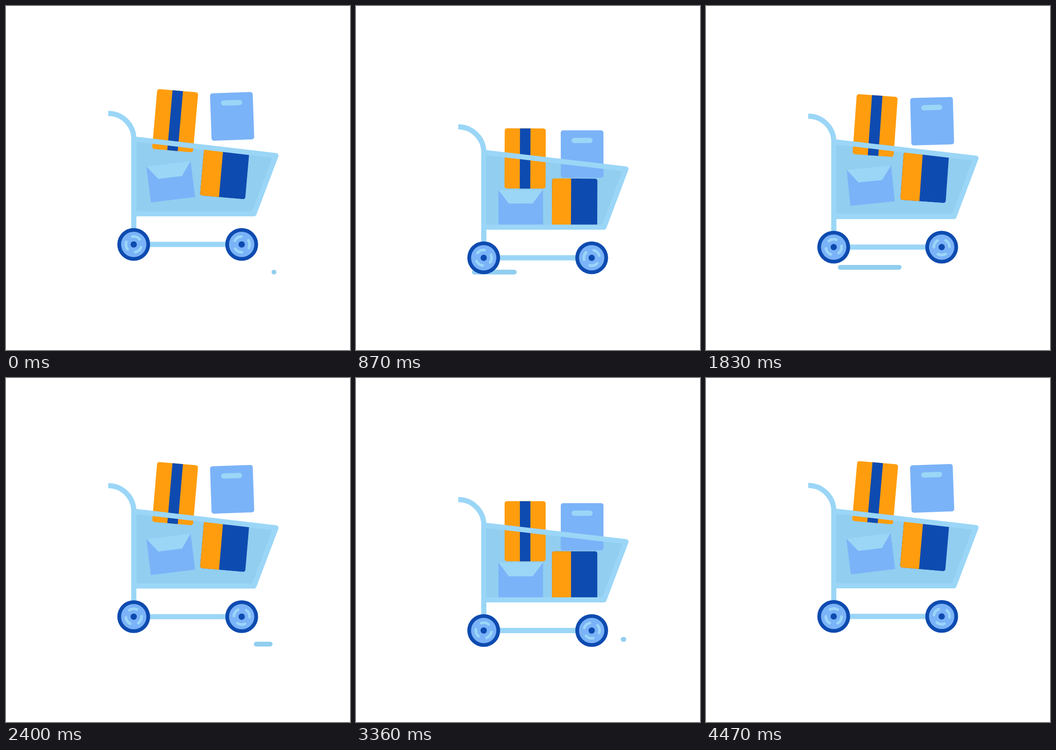
Animation of 720 by 720 pixels, one loop 4500 ms. Source, as an HTML page:

```html
<!DOCTYPE html>
<html lang="en">
<head>
<meta charset="utf-8">
<title>Shopping cart</title>
<style>
  html, body { margin: 0; width: 100%; height: 100%; overflow: hidden; background: #fff; }
  svg { display: block; width: 100vw; height: 100vh; }
  .light { fill: #9bd6f7; }
  .soft { fill: #7bb3f8; }
  .deep { fill: #0e4bb0; }
  .warm { fill: #ff9d0e; }
  .basket { fill: #92cef0; }
  .rail { fill: none; stroke: #9bd6f7; stroke-width: 10.8; stroke-linejoin: round; }
  .spoke { fill: none; stroke: #9bd6f7; stroke-width: 5.6; stroke-linecap: round; }
</style>
</head>
<body>
<svg viewBox="0 0 720 720">
  <defs>
    <clipPath id="card"><rect x="-47.5" y="-50" width="95" height="100" rx="5"/></clipPath>
  </defs>
  <rect id="dashLow" class="basket" y="552" height="10" rx="5"/>
  <rect id="dashHigh" class="basket" y="542" height="10" rx="5"/>
  <g id="cart">
    <path class="basket" d="M267.5 278.3 L565 313 L519 434.8 H267.5 Z"/>
    <g id="bag">
      <rect class="soft" x="-44.7" y="-49.6" width="89.4" height="99.2" rx="5"/>
      <rect class="light" x="-22" y="-34" width="44" height="11" rx="5.5"/>
    </g>
    <g id="parcel">
      <rect class="warm" x="-43" y="-63" width="86" height="126" rx="5"/>
      <rect class="deep" x="-11" y="-63" width="22" height="126"/>
    </g>
    <g id="letter">
      <rect class="soft" x="-46.7" y="-38" width="93.4" height="76"/>
      <path class="light" d="M-46.7 -38 H46.7 L25 -9 H-25 Z"/>
    </g>
    <g id="box">
      <g clip-path="url(#card)">
        <rect class="deep" x="-48" y="-50" width="96" height="100"/>
        <rect class="warm" x="-48" y="-50" width="40.5" height="100"/>
      </g>
    </g>
    <path class="rail" d="M267.5 278.3 L565 313 L519 434.8 H267.5"/>
    <path class="rail" d="M214 224.9 A53.5 53.5 0 0 1 267.5 278.4 V499 H493"/>
    <g id="wheels"></g>
  </g>
</svg>
<script>
const LOOP = 4500, CYCLE = 2235, HALF = CYCLE / 2;
const byId = id => document.getElementById(id);
const clamp = v => Math.min(1, Math.max(0, v));

// Cubic bezier easing with control points (a,0) and (b,1).
function ease(a, b, x) {
  x = clamp(x);
  let lo = 0, hi = 1, s = 0.5;
  for (let i = 0; i < 24; i++) {
    s = (lo + hi) / 2;
    const v = 3 * s * (1 - s) * ((1 - s) * a + s * b) + s * s * s;
    if (v < x) lo = s; else hi = s;
  }
  return s * s * (3 - 2 * s);
}

// Smooth curve through [time, value] points.
function curve(pts, t) {
  const last = pts.length - 1;
  let i = 0;
  while (i < last - 1 && t > pts[i + 1][0]) i++;
  const slope = k => {
    const p = pts[Math.max(0, k - 1)], q = pts[Math.min(last, k + 1)];
    return (q[1] - p[1]) / (q[0] - p[0]);
  };
  const [t0, v0] = pts[i], [t1, v1] = pts[i + 1];
  const h = t1 - t0, u = (t - t0) / h, w = 1 - u;
  return v0 * w * w * (1 + 2 * u) + v1 * u * u * (3 - 2 * u)
    + h * u * w * (slope(i) * w - slope(i + 1) * u);
}

const HEAD = [[0, 556], [165, 519], [322, 441], [427, 379], [480, 348], [705, 278], [1042, 212], [HALF, 206]];
const TAIL = [[0, 566], [165, 558], [322, 528], [480, 493], [705, 413], [HALF, 216]];

function drawDash(el, t) {
  const on = t > 0.5 && t < HALF - 10;
  el.setAttribute("visibility", on ? "visible" : "hidden");
  if (!on) return;
  const x = curve(HEAD, t);
  el.setAttribute("x", x);
  el.setAttribute("width", Math.max(10, curve(TAIL, t) - x));
}

// Place, extra fall and tilt of each item in the basket.
const items = [
  { el: byId("parcel"), x: 354, y: 240, fall: 51.3, tilt: 5 },
  { el: byId("bag"), x: 473.3, y: 231, fall: 51, tilt: -2 },
  { el: byId("box"), x: 457.6, y: 350.8, fall: 32.3, tilt: 5 },
  { el: byId("letter"), x: 344.8, y: 367.8, fall: 26.7, tilt: -7.2 }
];

function arc(mid) {
  const at = deg => {
    const r = deg * Math.PI / 180;
    return (16.4 * Math.cos(r)).toFixed(2) + " " + (16.4 * Math.sin(r)).toFixed(2);
  };
  return `<path class="spoke" d="M${at(mid - 29)} A16.4 16.4 0 0 1 ${at(mid + 29)}"/>`;
}

const wheels = [{ x: 267.3, start: 49 }, { x: 493.3, start: 117 }];
byId("wheels").innerHTML = wheels.map(w => `<g transform="translate(${w.x} 499)">
  <circle class="deep" r="34.3"/><circle class="soft" r="26.5"/>
  <g class="spin">${[0, 120, 240].map(arc).join("")}</g>
  <circle class="deep" r="6.6"/></g>`).join("");
const spins = document.querySelectorAll(".spin");

function draw(time) {
  const t = time % LOOP;
  const p = t >= 2 * CYCLE ? 0 : t % CYCLE;
  const down = p < HALF;
  const sink = down ? ease(0.7, 0.33, p / HALF) : 1 - ease(0.8, 0.3, (p - HALF) / HALF);
  const drop = down ? ease(0.7, 0.3, p / 928) : 1 - ease(0.7, 0.3, (p - 1305) / 735);

  byId("cart").setAttribute("transform", `translate(0 ${29.5 * sink})`);
  for (const it of items) {
    it.el.setAttribute("transform",
      `translate(${it.x} ${it.y + it.fall * drop}) rotate(${it.tilt * (1 - sink)})`);
  }
  spins.forEach((el, i) =>
    el.setAttribute("transform", `rotate(${wheels[i].start + 8 * 360 * t / LOOP})`));
  drawDash(byId("dashLow"), p);
  drawDash(byId("dashHigh"), p - HALF);
}

const begin = performance.now();
function tick() {
  draw(performance.now() - begin);
  requestAnimationFrame(tick);
}
draw(0);
requestAnimationFrame(tick);
</script>
</body>
</html>
```
